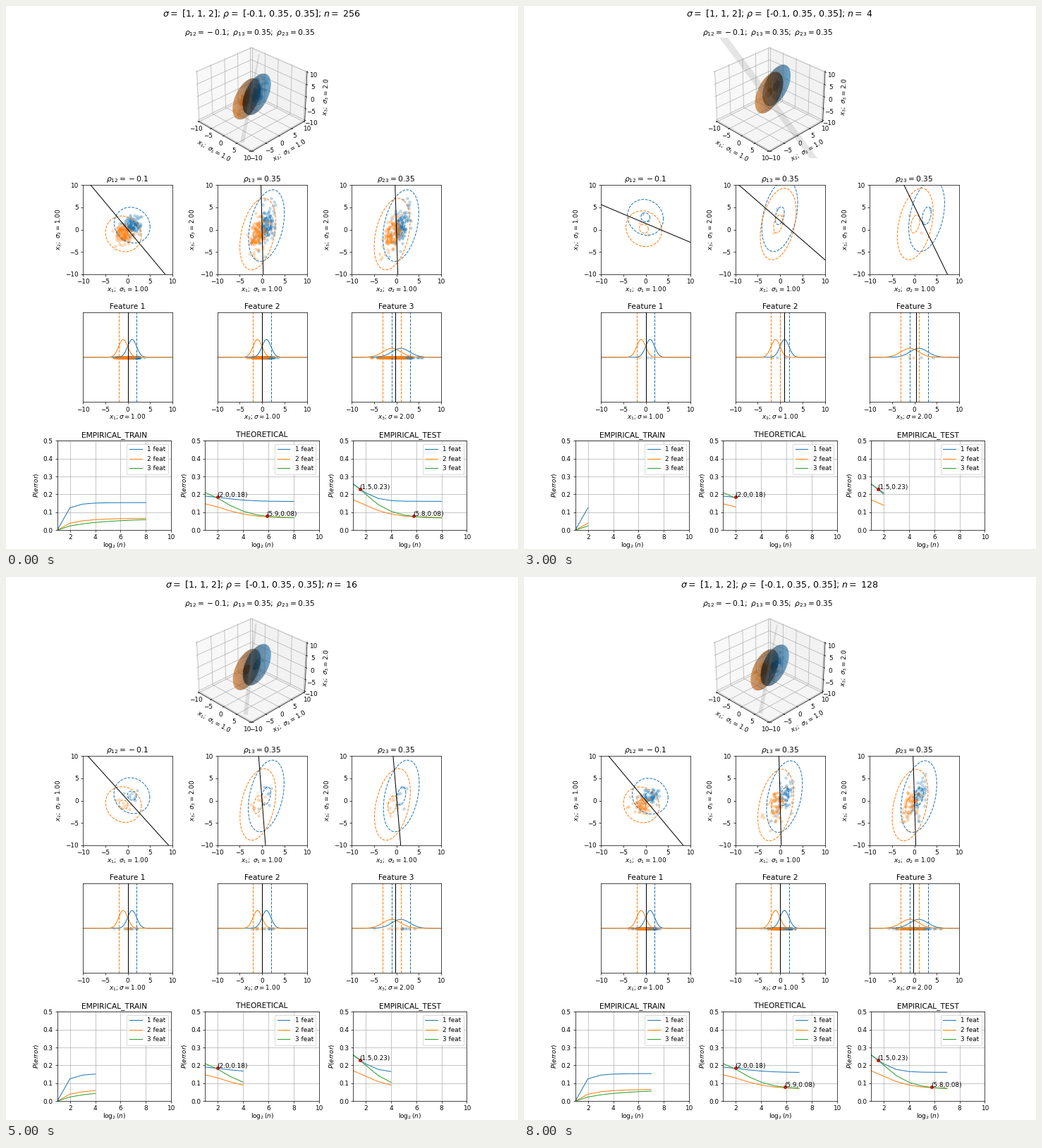
Write a matplotlib script that moves like this. It is 726 px wide and 771 px high and loops after 9000 ms.

```python
import numpy as np
import matplotlib.pyplot as plt
from matplotlib.animation import FuncAnimation
from matplotlib.colors import to_rgb
from matplotlib.patches import Polygon
from matplotlib.transforms import Affine2D

W, H, DPI = 726, 771, 64
BLUE, ORANGE, GREEN = "C0", "C1", "C2"
TICKS = [-10, -5, 0, 5, 10]
SIGMA = np.array([1.0, 1.0, 2.0])
RHO = np.array([[1, -0.1, 0.35], [-0.1, 1, 0.35], [0.35, 0.35, 1]])
COV = RHO * np.outer(SIGMA, SIGMA)
CHOL = np.linalg.cholesky(COV)
PAIRS = [(0, 1), (0, 2), (1, 2)]
SIZES = [256, 0] + [2 ** k for k in range(1, 8)]

# Estimates from a tiny sample and where they settle as n grows
BLUE_MEAN = (-0.05, 2.75, 3.1), (1, 1, 0.9)
ORANGE_MEAN = (-0.4, 0.2, 1.25), (-0.95, -0.95, -1)
NORMAL = (0.87, 2.06, 1), (1.2, 1, 0.03)
CUT = (0, 0.95, 0.45), (0, 0, -0.2)
BAND = (((277, 45), (289, 45), (416, 216), (405, 216)),
        ((358, 68), (360, 68), (338, 194), (332, 194)))

# Power of the decay, marked crossings, then (first, last, pace) per curve
ERRORS = {
    "EMPIRICAL_TRAIN": (
        0.8, (), ((0, 0.154, 0.53), (0, 0.067, 1.2), (0, 0.068, 3))),
    "THEORETICAL": (
        1.5, ((1.96, 0.184), (5.86, 0.078)),
        ((0.19, 0.16, 2.5), (0.147, 0.069, 2.5), (0.21, 0.068, 2.5))),
    "EMPIRICAL_TEST": (
        1.35, ((1.53, 0.23), (5.77, 0.078)),
        ((0.257, 0.161, 1.3), (0.17, 0.07, 2.1), (0.26, 0.067, 2.1))),
}

plt.rcParams["lines.linewidth"] = 1.15
fig = plt.figure(figsize=(W / DPI, H / DPI), dpi=DPI, facecolor="white")
pixels = Affine2D().scale(1 / W, -1 / H).translate(0, 1) + fig.transFigure
headline = fig.text(0.5, 1 - 11 / H, "", size=14.2, ha="center", va="center")


def add_axes(x, y, w, h, **kw):
    ax = fig.add_axes([x / W, 1 - (y + h) / H, w / W, h / H], **kw)
    ax.xaxis.labelpad = 0
    return ax


def name(i, fmt=".2f"):
    return rf"$x_{i + 1};\ \sigma_{i + 1}={SIGMA[i]:{fmt}}$"


def rho(i, j):
    value = f"{RHO[i, j]:g}"
    gap = "{}" if value.startswith("-") else ""
    return rf"\rho_{{{i + 1}{j + 1}}}={gap}{value}"


def make_space():
    ax = add_axes(260.7, 46, 170, 170, projection="3d", elev=30, azim=-45)
    lim = (-10 * 25 / 24, 10 * 25 / 24)
    ax.set(xlim=lim, ylim=lim, zlim=lim, xticks=TICKS, yticks=TICKS,
           zticks=TICKS, xlabel=name(0, ".1f"), ylabel=name(1, ".1f"),
           zlabel=name(2, ".1f"))
    ax.tick_params(pad=-2.5)
    for axis in (ax.xaxis, ax.yaxis, ax.zaxis):
        axis.labelpad = -2.5
    # Axes3D lowers its title by a factor of 0.92
    ax.set_title("$" + r";\ ".join(rho(*p) for p in PAIRS) + "$", y=1 / 0.92)
    return ax


def make_pair(col, i, j):
    ax = add_axes(109 + 190.5 * col, 254, 127, 127)
    ax.set(xlim=(-10, 10), ylim=(-10, 10), xticks=TICKS, yticks=TICKS,
           xlabel=name(i), ylabel=name(j))
    ax.set_title(f"${rho(i, j)}$")
    return ax


def make_feature(i):
    ax = add_axes(109 + 190.5 * i, 435.3, 127, 127)
    ax.set(xlim=(-10, 10), ylim=(-1, 1), xticks=TICKS, yticks=[],
           xlabel=rf"$x_{i + 1};\sigma={SIGMA[i]:.2f}$")
    ax.set_title(f"Feature {i + 1}")
    x, s = np.linspace(-10, 10, 300), SIGMA[i]
    for mean, color in ((1, BLUE), (-1, ORANGE)):
        ax.plot(x, np.exp(-((x - mean) / s) ** 2 / 2) / (s * np.sqrt(2 * np.pi)),
                color=color)
        for edge in (mean - s, mean + s):
            ax.axvline(edge, color=color, ls="--")
    return ax


def make_errors(col, title):
    ax = add_axes(72.7 + 209.7 * col, 617.2, 161.4, 127)
    curves = [ax.plot([], [], color=c, label=f"{k} feat")[0]
              for k, c in enumerate((BLUE, ORANGE, GREEN), 1)]
    ax.set(xlim=(1, 10), ylim=(0, 0.5), xticks=[2, 4, 6, 8, 10],
           yticks=np.arange(6) / 10, xlabel=r"$\log_2(n)$", ylabel="$P(error)$")
    ax.set_title(title)
    ax.grid(True)
    ax.legend(loc="upper right")
    return ax, curves


space = make_space()
pairs = [make_pair(c, i, j) for c, (i, j) in enumerate(PAIRS)]
features = [make_feature(i) for i in range(3)]
errors = {t: make_errors(c, t) for c, t in enumerate(ERRORS)}
live = []

u, v = np.meshgrid(np.linspace(0, 2 * np.pi, 31), np.linspace(0, np.pi, 25))
SPHERE = np.stack([np.cos(u) * np.sin(v), np.sin(u) * np.sin(v), np.cos(v)])
BALL = np.tensordot(CHOL, SPHERE, 1)
angle = np.linspace(0, 2 * np.pi, 120)
CIRCLE = np.stack([np.cos(angle), np.sin(angle)])


def settle(ends, n):
    """Move from the small-sample estimate to the final one."""
    start, end = map(np.array, ends)
    return end + (start - end) * min(1, (4 / n) ** 2)


def ellipsoid(mean, radius, color):
    x, y, z = BALL * radius + np.reshape(mean, (3, 1, 1))
    side = (BALL[0] + BALL[1]) / np.sqrt(2) / 0.95
    light = 0.55 + 0.45 * side if color == BLUE else 0.45 - 0.35 * side
    faces = np.full(light.shape + (4,), 0.4)
    faces[..., :3] = np.clip(light, 0, 1)[..., None] * to_rgb(color)
    live.append(space.plot_surface(x, y, z, rstride=1, cstride=1, shade=False,
                                   facecolors=faces, linewidth=0,
                                   antialiased=True))


def dots(ax, color, *coords):
    live.append(ax.scatter(*coords, s=16, color=color, alpha=0.25,
                           linewidths=0.9))


def draw_class(rng, n, mean, color, sign):
    half = n // 2
    pts = rng.standard_normal((half, 3)) @ CHOL.T
    pts += mean - pts.mean(axis=0)
    for radius in (1, 4):
        ellipsoid(mean, radius, color)
    dots(space, color, *pts.T)
    for ax, (i, j) in zip(pairs, PAIRS):
        dots(ax, color, pts[:, i], pts[:, j])
        root = np.linalg.cholesky(COV[np.ix_([i, j], [i, j])])
        for radius in (1, 4):
            x, y = radius * root @ CIRCLE
            live.extend(ax.plot(x + mean[i], y + mean[j], "--", color=color))
    for ax, s in zip(features, SIGMA):
        dots(ax, color, sign + s * rng.standard_normal(half), np.zeros(half))


def draw_splits(n, middle):
    normal = settle(NORMAL, n)
    y = np.array([10, -10])
    for ax, (i, j) in zip(pairs, PAIRS):
        x = middle[i] - (y - middle[j]) * normal[j] / normal[i]
        live.extend(ax.plot(x, y, color="black"))
    for ax, cut in zip(features, settle(CUT, n)):
        live.append(ax.axvline(cut, color="black"))
    band = Polygon(settle(BAND, n), color="0.5", alpha=0.2, lw=0,
                   transform=pixels)
    live.append(fig.add_artist(band))


def draw_errors(count):
    k = np.arange(1, count + 1)
    for title, (power, crossings, shapes) in ERRORS.items():
        ax, curves = errors[title]
        for curve, (first, last, pace) in zip(curves, shapes):
            decay = np.exp(-((k - 1) / pace) ** power)
            curve.set_data(k, last + (first - last) * decay)
        for x, y in crossings:
            if x < count:
                live.extend(ax.plot(x, y, "o", color="#c41e14", ms=4.5))
                live.append(ax.text(x, y, f"({x:.1f},{y:.2f})"))


def update(frame):
    while live:
        live.pop().remove()
    n = SIZES[frame]
    headline.set_text(r"$\sigma=$ [1, 1, 2]; $\rho=$ [-0.1, 0.35, 0.35]; "
                      rf"$n=$ {n}")
    draw_errors(int(np.log2(n)) if n else 0)
    if n:
        rng = np.random.default_rng(n)
        blue, orange = settle(BLUE_MEAN, n), settle(ORANGE_MEAN, n)
        draw_class(rng, n, blue, BLUE, 1)
        draw_class(rng, n, orange, ORANGE, -1)
        draw_splits(n, (blue + orange) / 2)


anim = FuncAnimation(fig, update, frames=len(SIZES), interval=1000, repeat=True)
plt.show()
```
